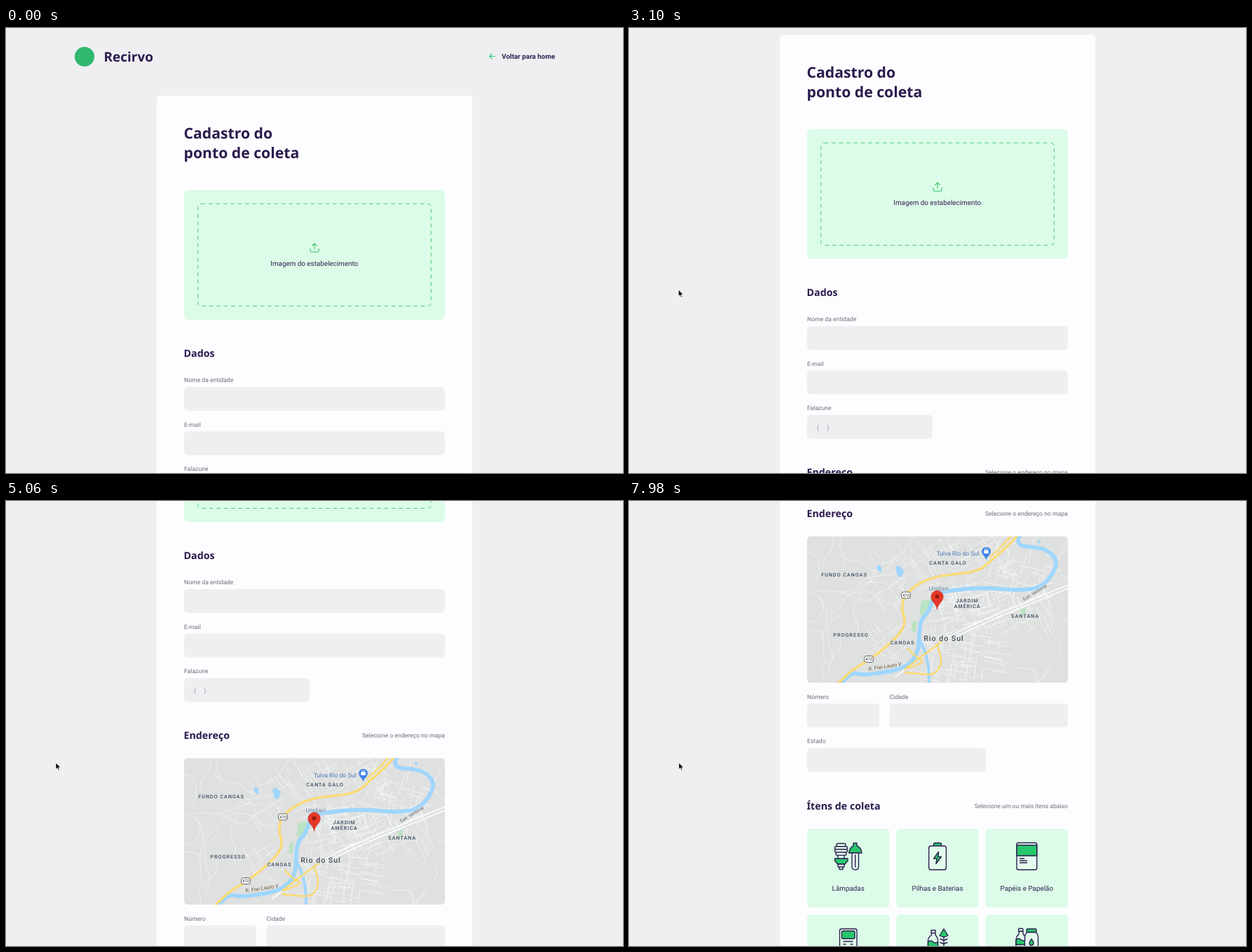
These frames come from a looping animation (880 px wide and 636 px high, 8000 ms). An HTML page:

```html
<!DOCTYPE html>
<html lang="pt-BR">
<head>
<meta charset="utf-8">
<title>Cadastro do ponto de coleta</title>
<style>
  html, body { margin: 0; width: 100%; height: 100%; overflow: hidden; background: #efeff2; }
  svg { display: block; width: 880px; height: 636px; overflow: hidden; }
  text { font-family: Roboto, sans-serif; text-rendering: geometricPrecision; fill: #322153; white-space: pre; }
  .head { font-family: "Noto Sans", "Open Sans", sans-serif; font-weight: 700; fill: #2c1a4d; }
  .title { font-size: 21.2px; }
  .brand { font-size: 19px; }
  .section { font-size: 14.25px; }
  .label { font-size: 8.63px; fill: #6c6c7c; }
  .body { font-size: 9.86px; }
  .link { font-size: 9.86px; font-weight: 700; }
  .hint { font-size: 9.86px; fill: #a0a0ae; }
  .end { text-anchor: end; }
  .mid { text-anchor: middle; }
  .line { fill: none; stroke-linecap: round; stroke-linejoin: round; }
  .map text { text-anchor: middle; paint-order: stroke; stroke: #e8e9e9; stroke-width: 1.3px; stroke-linejoin: round; }
  .map .area { font-size: 7.4px; font-weight: 600; letter-spacing: .85px; fill: #52616f; }
  .map .city { font-size: 10.6px; font-weight: 500; letter-spacing: 1px; fill: #424c56; }
  .map .place { font-size: 8.5px; fill: #587f9f; }
  .map .shop { font-size: 8.6px; fill: #3d70ae; }
  .map .road { font-size: 7.4px; fill: #5f4d2c; }
  .map .shield { font-size: 6px; fill: #333; stroke: none; }
  .icon { fill: #e3fbed; stroke: #2a1c4c; stroke-width: 1.35px; stroke-linejoin: round; stroke-linecap: round; }
  .icon .g { fill: #27c76c; }
  .icon .n { fill: none; }
</style>
</head>
<body>
<svg viewBox="0 0 880 636">
  <g id="page"></g>
  <path id="cursor" d="M0 0V9.6L2.2 7.6L3.8 11.1L5.4 10.4L3.9 7H6.9Z" fill="#000" stroke="#fff" stroke-width=".8"/>
</svg>
<script>
const GREEN = '#34cb79', MINT = '#dcfbe8', FIELD = '#efeff1';

const text = (cls, x, y, str, extra = '') =>
  `<text class="${cls}" x="${x}" y="${y}" ${extra}>${str}</text>`;
const rect = (x, y, w, h, fill, rx = 0, extra = '') =>
  `<rect x="${x}" y="${y}" width="${w}" height="${h}" rx="${rx}" fill="${fill}" ${extra}/>`;
const line = (d, color, width) =>
  `<path class="line" d="${d}" stroke="${color}" stroke-width="${width}"/>`;
const field = (label, x, y, w) =>
  text('label', x, y - 7, label) + rect(x, y, w, 34, FIELD, 5);
const shift = (y, body, cls = '') => `<g class="${cls}" transform="translate(0 ${y})">${body}</g>`;

// Smooth curve through a few "x,y" points
function curve(points) {
  const p = points.split(' ').map(s => s.split(',').map(Number));
  let d = `M${p[0]}`;
  for (let i = 0; i < p.length - 1; i++) {
    const [a, b, c, e] = [p[i - 1] || p[i], p[i], p[i + 1], p[i + 2] || p[i + 1]];
    d += `C${b[0] + (c[0] - a[0]) / 6} ${b[1] + (c[1] - a[1]) / 6} ` +
         `${c[0] - (e[0] - b[0]) / 6} ${c[1] - (e[1] - b[1]) / 6} ${c}`;
  }
  return d;
}

let seed = 41;
const rand = () => (seed = (seed * 16807) % 2147483647) / 2147483647;
const spread = r => (rand() * 2 - 1) * r;

// Blocks of short crossing streets: centre, radii, angle, count
function streets(cx, cy, rx, ry, angle, count) {
  let d = '';
  while (count--) {
    const a = (angle + (rand() < .5 ? 90 : 0) + spread(4)) * Math.PI / 180;
    const n = 6 + rand() * 13;
    const x = cx + spread(rx), y = cy + spread(ry);
    const dx = Math.cos(a) * n, dy = Math.sin(a) * n;
    d += `M${(x - dx).toFixed(1)} ${(y - dy).toFixed(1)}l${(dx * 2).toFixed(1)} ${(dy * 2).toFixed(1)}`;
  }
  return d;
}

function lane(x, y, angle, steps) {
  const points = [];
  while (steps--) {
    points.push(`${x.toFixed(1)},${y.toFixed(1)}`);
    angle += spread(.65);
    x += Math.cos(angle) * 11;
    y += Math.sin(angle) * 11;
  }
  return curve(points.join(' '));
}

function map() {
  const river = [
    '559,388 555,398 561,405 578,407 594,411 606,421 609,432 603,446 592,459 578,466 550,468 520,466 490,466 460,469 444,472 434,482 427,498 417,512 414,530 413,548 408,563 397,575 378,583 355,587 335,589 318,588 302,602',
    '413,536 422,556 427,578 428,603'
  ];
  const yellow = [
    '555,389 540,405 520,423 503,437 485,443 460,446 437,450 418,457 403,467 392,481 390,496 393,514 386,530 370,546 345,566 320,582 298,602',
    '546,390 532,405 515,421',
    '447,541 427,556 411,568 394,581',
    '398,552 408,562 418,571 398,580',
    '394,586 415,588 436,587 445,570 440,548'
  ];
  const avenues = ['626,461 580,480 520,505 460,533 428,556 380,592',
                   '626,466 580,485 520,510 464,536'];
  let lanes = curve('626,394 618,412 609,436 626,452');
  for (let i = 0; i < 17; i++) lanes += lane(256 + rand() * 125, 395 + rand() * 195, rand() * 6.3, 10);
  for (let i = 0; i < 6; i++) lanes += lane(540 + rand() * 80, 510 + rand() * 80, rand() * 6.3, 9);
  const grid = streets(470, 428, 85, 30, -30, 60) + streets(470, 490, 45, 28, -12, 55) +
    streets(530, 500, 75, 35, -25, 85) + streets(475, 565, 55, 32, 8, 75) +
    streets(560, 440, 45, 35, 15, 35) + streets(365, 490, 30, 70, -35, 30);
  const shield = (x, y) => rect(x - 6.5, y - 4.5, 13, 9, '#fff', 3, 'stroke="#555" stroke-width=".9"') +
    text('shield', x, y + 2.2, '470');
  const labels = [
    ['area', 307, 448.5, 'FUNDO CANOAS'], ['area', 455, 431.5, 'CANTA GALO'],
    ['area', 482.5, 486, 'JARDIM'], ['area', 482.5, 494, 'AMÉRICA'],
    ['area', 565, 507.5, 'SANTANA'], ['area', 316.5, 534.5, 'PROGRESSO'],
    ['area', 390, 546, 'CANOAS'], ['city', 449, 541, 'Rio do Sul'],
    ['place', 441.5, 469, 'Unidavi'], ['shop', 469, 418.7, 'Tulva Rio do Sul']
  ];
  return `<clipPath id="frame">${rect(254, 391.5, 372, 209.3, '#000', 5)}</clipPath><g clip-path="url(#frame)">` +
    rect(254, 391, 372, 210, '#dfe0e0') +
    line(lanes, '#f5f6f6', .75) + line(grid, '#f6f7f7', .75) +
    `<path d="M417 484L430 482L428 497L421 507L414 502ZM404 514L411 512L409 528L403 527ZM558 496L566 494L565 505L560 507Z" fill="#b9e3c1"/>` +
    river.map((p, i) => line(curve(p), '#9fd6fd', i ? 4 : 5.8)).join('') +
    `<path d="M353 437Q355 430 359 434L361 441Q357 445 353 437ZM380 437Q384 431 387 435L392 440L389 449Q382 451 382 444ZM583 397h4v4h-4Z" fill="#9fd6fd"/>` +
    avenues.map(p => line(curve(p), '#fcfcfc', 1.7)).join('') +
    yellow.map((p, i) => line(curve(p), '#f4cb58', i ? 2.3 : 3.2) + line(curve(p), '#ffe27a', i ? 1.4 : 2)).join('') +
    labels.map(l => text(...l)).join('') +
    text('road', 365, 580, 'R. Frei Lauro V', 'transform="rotate(-9 365 577)"') +
    text('road', 579, 474, 'Estr. Ventoral', 'transform="rotate(-32 579 472)" style="font-size:6.5px;fill:#4d565f"') +
    shield(395, 475.5) + shield(342, 567) +
    `<path d="M509.5 425C508 420 503.2 418 503.2 413A6.3 6.3 0 0 1 515.8 413C515.8 418 511 420 509.5 425Z" fill="#3f82ea"/>` +
    rect(506.3, 411.3, 6.4, 4.8, '#fff', .5) + line('M507.8 411V409.7Q509.5 407.5 511.2 409.7V411', '#fff', .9) +
    `<path d="M439.5 496C438.4 487 430.8 485.5 430.8 477.8A8.7 8.7 0 0 1 448.2 477.8C448.2 485.5 440.6 487 439.5 496Z" fill="#e53829" stroke="#b92b20" stroke-width=".6"/>` +
    `<circle cx="439.5" cy="477.5" r="2.9" fill="#97190f"/></g>`;
}

const box = (x, y, w, h, cls = '', rx = 1.5) =>
  `<rect class="${cls}" x="${x}" y="${y}" width="${w}" height="${h}" rx="${rx}"/>`;
const shape = (d, cls = '') => `<path class="${cls}" d="${d}"/>`;

const icons = [
  box(296, 489.5, 13, 4.2, '', 2) + box(293.5, 493.7, 18, 4.2, '', 2) + box(293.5, 497.9, 18, 4.2, '', 2) +
    box(295, 502.1, 15, 4.2, '', 2) + shape('M298 506.3v5M307 506.3v5', 'n') +
    shape('M293.5 511h18.5v3l-4 5h-10.5l-4-5Z', 'g') + shape('M298 519h9v4h-9ZM300 523h5v3.5h-5Z') +
    shape('M320 493v-4h5v4Q331 495 332 503H313.5Q315 495 320 493Z', 'g') +
    shape('M318 503h9.5v20q0 4-4.7 4t-4.8-4ZM322.7 506v17'),
  box(434.5, 488.7, 11, 6, 'g', 2) + box(427.7, 493, 24.7, 34, '', 3) +
    shape('M441.5 501.5L434.5 511h4.5l-1.2 7.5L445.5 508.5h-4.5Z', 'g'),
  box(553, 488.5, 28.7, 38.5, '', 2.5) + shape('M553 492h28.7v15H553Z', 'g') +
    shape('M557.5 511h6M557.5 514h10M557.5 517h10', 'n'),
  box(300.5, 611.5, 24.5, 40, '', 2.5) + box(303.5, 614.5, 18.5, 11, 'g') +
    shape('M306 629.5h13M306 633.5h3M316 633.5h3', 'n'),
  shape('M431 613.5h6v4h-6ZM431.5 617.5v3q-5 3-5 8v12h14v-12q0-5-3.5-8v-3Z') +
    shape('M426.5 630q4-3 7 0t7 0v10h-14Z', 'g') + shape('M449 611.5L455 621Q449 625 443 621Z', 'g') +
    shape('M449 623v17M444 626l5 2l5-2M444 631l5 2l5-2', 'n'),
  box(555.5, 611, 6.5, 4) + shape('M556 615v4q-4 4-4 9v12h14v-12q0-5-4-9v-4Z') +
    shape('M552 627q4-3 7 0t7 0v7h-14Z', 'g') + box(567, 611.5, 14, 5, 'g') +
    shape('M567.5 616.5q-3 3-3 6v18h19v-18q0-3-3-6Z') + shape('M574 626q-6 8 0 9q6-1 0-9Z', 'g')
];
const names = ['Lâmpadas', 'Pilhas e Baterias', 'Papéis e Papelão'];

function items() {
  return icons.map((icon, i) => {
    const x = 254 + (i % 3) * 127.3, y = i < 3 ? 468.5 : 591;
    return rect(x, y, 117.5, 112.5, MINT, 5) + `<g class="icon">${icon}</g>` +
      (names[i] ? text('body mid', x + 58.7, 557.3, names[i]) : '');
  }).join('');
}

document.getElementById('page').innerHTML =
  `<circle cx="112" cy="41" r="14" fill="#2fb86e"/>` +
  text('head brand', 139.5, 47.5, 'Recirvo') +
  line('M697.5 40.5H689.5M693 37L689.5 40.5L693 44', GREEN, 1.2) + text('link end', 783, 44, 'Voltar para home') +
  rect(215, 97, 450, 1500, '#fdfdff', 5) +
  text('head title', 253.5, 158, 'Cadastro do') + text('head title', 253.5, 186, 'ponto de coleta') +
  rect(254, 231.5, 372, 185.5, MINT, 6) +
  rect(273.7, 251.2, 332.6, 146.3, 'none', 5, 'stroke="#4ecb79" stroke-dasharray="5.6 4.8"') +
  line('M434 315.5V318.5Q434 320 435.5 320H444.5Q446 320 446 318.5V315.5M440 316V308M436.7 311.2L440 308L443.3 311.2', '#4ecb79', 1.25) +
  text('body mid', 439.7, 340.3, 'Imagem do estabelecimento') +
  text('head section', 253.5, 470, 'Dados') +
  field('Nome da entidade', 254, 513, 372) +
  field('E-mail', 254, 576.5, 372) +
  field('Falazune', 254, 640, 179) + text('hint', 268, 660.5, '(   )', 'style="letter-spacing:.8px"') +
  text('head section', 253.5, 727, 'Endereço') +
  text('label end', 625.7, 724.7, 'Selecione o endereço no mapa') +
  shift(363, map(), 'map') +
  field('Número', 254, 993.5, 103) + field('Cidade', 371.5, 993.5, 254.5) +
  field('Estado', 254, 1057, 255) +
  text('head section', 253.5, 1145, 'Ítens de coleta') +
  text('label end', 625.7, 1142.7, 'Selecione um ou mais ítens abaixo') +
  shift(704, items());

// Rows are [step, value...]
const scrollKeys = [[20, 0], [26, 36], [34, 55], [37, 55], [43, 76], [53, 87], [78, 87], [85, 178], [92, 300],
  [100, 363], [111, 387], [139, 387], [147, 482], [154, 604], [161, 679], [172, 704]];
const cursorKeys = [[2, 640, 625], [7, 767, 29], [12, 250, 130], [15, 4, 300], [18, 70.5, 374], [69, 70.5, 374], [70, 71, 374]];

// Monotone cubic interpolation
function sample(keys, step, col = 1) {
  const last = keys.length - 1;
  if (step <= keys[0][0]) return keys[0][col];
  if (step >= keys[last][0]) return keys[last][col];
  const i = keys.findIndex(k => k[0] > step) - 1;
  const slope = j => (keys[j + 1][col] - keys[j][col]) / (keys[j + 1][0] - keys[j][0]);
  const tangent = j => {
    if (j === 0 || j === last) return 0;
    const a = slope(j - 1), b = slope(j);
    return a * b > 0 ? 2 * a * b / (a + b) : 0;
  };
  const [a, b] = [keys[i], keys[i + 1]], h = b[0] - a[0], u = (step - a[0]) / h;
  const w = u * u * (3 - 2 * u);
  return a[col] * (1 - w) + b[col] * w +
    h * u * (1 - u) * ((1 - u) * tangent(i) - u * tangent(i + 1));
}

const page = document.getElementById('page'), cursor = document.getElementById('cursor');
const start = performance.now();

function draw() {
  // Steps come in threes lasting 20, 20 and 100 ms
  const t = (performance.now() - start) % 8000 + 20;
  const step = 3 * Math.floor(t / 140) + Math.min(2, Math.floor(t % 140 / 20));
  page.setAttribute('transform', `translate(0 ${-Math.round(sample(scrollKeys, step))})`);
  cursor.setAttribute('visibility', step < 2 ? 'hidden' : 'visible');
  cursor.setAttribute('transform', `translate(${sample(cursorKeys, step)} ${sample(cursorKeys, step, 2)})`);
  requestAnimationFrame(draw);
}
draw();
</script>
</body>
</html>
```
